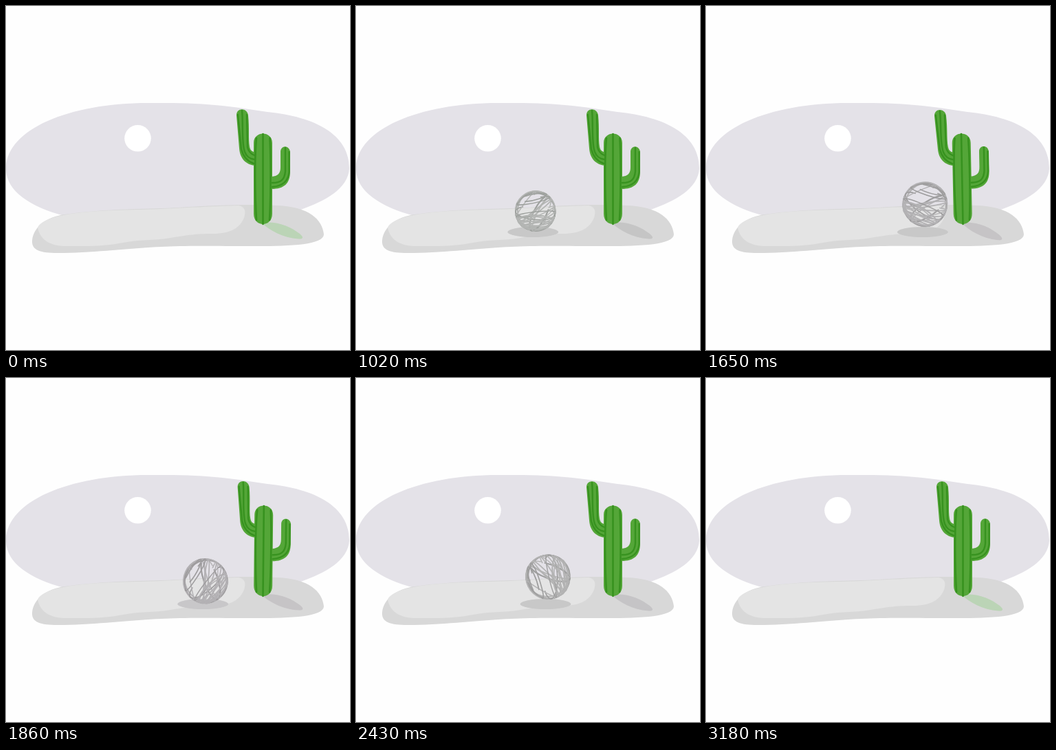
Animation, 500 px wide and 500 px high, one loop 4140 ms. Source, as an HTML page with a canvas:

```html
<!DOCTYPE html>
<html lang="en">
<head>
<meta charset="utf-8">
<title>Tumbleweed</title>
<style>
html, body { margin: 0; width: 100%; height: 100%; overflow: hidden; background: #fefefe; }
canvas { display: block; width: 500px; height: 500px; }
</style>
</head>
<body>
<canvas id="stage" width="500" height="500"></canvas>
<script>
const ctx = document.getElementById('stage').getContext('2d');
const LOOP = 4140, START = 60, END = 3180;

// Keyframes as [ms, value]
const travel = [[60, 62], [600, 133], [1020, 257], [1380, 326], [1650, 315], [2200, 250], [2700, 333], [3180, 442]];
const lift = [[60, 0], [330, 9], [600, 0], [830, 14], [1020, 3.5], [1080, 0], [1400, 18], [1650, 13.5],
  [2130, 0], [2200, 0], [2470, 13], [2700, 7.5], [2820, 0], [3000, 8], [3180, 0]];
const spin = [[60, -120], [600, 10], [1020, 150], [1380, 235], [1650, 180], [2200, 15], [2700, 145], [3180, 340]];
const radius = [[60, 29.5], [1020, 29.5], [1400, 32.5], [3180, 32.5]];
const sway = [[1330, 0], [1480, 2.8], [1650, -1.1], [1800, 0.7], [2000, 0]];
const tint = [[60, 1], [600, 0.6], [1020, 0], [2700, 0.05], [3180, 1]];
const alpha = [[60, 0], [300, 1], [2850, 1], [3180, 0]];

// Cubic interpolation that comes to rest at turning points
function at(keys, t) {
  const n = keys.length - 1;
  if (t <= keys[0][0]) return keys[0][1];
  if (t >= keys[n][0]) return keys[n][1];
  const i = keys.findIndex(k => k[0] > t) - 1;
  const rate = j => (keys[j + 1][1] - keys[j][1]) / (keys[j + 1][0] - keys[j][0]);
  const slope = j => {
    if (j === 0) return rate(0);
    if (j === n) return rate(n - 1);
    if (rate(j - 1) * rate(j) <= 0) return 0;
    return (keys[j + 1][1] - keys[j - 1][1]) / (keys[j + 1][0] - keys[j - 1][0]);
  };
  const span = keys[i + 1][0] - keys[i][0], u = (t - keys[i][0]) / span, v = 1 - u;
  return keys[i][1] * (1 + 2 * u) * v * v + slope(i) * span * u * v * v
    + keys[i + 1][1] * u * u * (3 - 2 * u) - slope(i + 1) * span * u * u * v;
}

const mix = (a, b, k) => `rgb(${a.map((c, i) => Math.round(c + (b[i] - c) * k))})`;

function fill(path, color) {
  ctx.fillStyle = color;
  ctx.fill(path);
}

function ellipse(x, y, rx, ry) {
  const p = new Path2D();
  p.ellipse(x, y, rx, ry, 0, 0, 7);
  return p;
}

const sky = new Path2D('M0 238C-2 180 92 139 215 141C290 140 330 146 380 154C450 161 499 187 499 236C497 266 465 283 426 297L300 320H100L85 305C35 292 1 269 0 238Z');
const dune = new Path2D('M38 341C40 321 58 307 85 303C145 294 215 295 250 293C310 289 360 288 395 290C440 292 460 310 462 332C461 347 415 349 365 349C300 349 260 348 225 350C165 353 125 359 75 359C50 359 37 355 38 341Z');
const light = new Path2D('M46 322C52 310 75 305 95 302C145 295 190 297 225 295C265 293 300 291 338 290C349 292 349 301 345 310C338 325 322 331 300 331C275 331 265 333 245 336C222 341 195 339 170 344C140 350 110 349 85 349C60 348 49 337 46 322Z');
const shade = new Path2D('M371 315C395 312 414 321 427 331C434 337 431 339 425 338.5C402 337 383 326 371 315Z');
const cactus = new Path2D('M335 159C335 147 351 148 352 159C354 178 352 193 354 204C355 211 359 212 364 213L363 232C348 231 340 221 339 207Z'
  + 'M399 212C399 202 412 202 413 212V241C413 258 404 266 386 266V248C396 247 399 243 399 234Z'
  + 'M360 199C360 181 387 181 387 199L387 302C387 322 360 322 360 302Z');
const ribs = new Path2D('M343 152C345 172 342 198 347 212C350 220 355 222 361 223M337 158L342 208Q346 224 360 229M350 158L351 205Q353 214 361 217'
  + 'M406 206V240C405 253 399 257 387 257M411.5 212V241Q410 261 387 263');
const bodyRibs = new Path2D('M364 192C361 220 362 280 364 311M373.5 186V317M383.5 192C385 220 385 280 383 311');

// Strands are tilted slices of a unit sphere
let seed = 11;
const rand = () => (seed = seed * 16807 % 2147483647) / 2147483647;
const strands = Array.from({ length: 25 }, (_, i) => {
  const rim = i < 5;
  const off = rim ? (rand() - 0.5) * 0.1 : (rand() - 0.5) * 1.4;
  const rx = Math.sqrt(1 - off * off) * 0.98;
  return { off, rx, ry: rim ? 0.88 + rand() * 0.1 : rx * (0.06 + rand() * 0.3),
    tilt: (rand() - 0.5) * (rim ? 6 : 1.2), from: rand() * 6, arc: rim ? 6.3 : 3 + rand() * 2,
    width: 1.1 + rand() * 1.1, dark: rand() < 0.3 };
});

function drawBall(x, y, r, angle, green) {
  ctx.save();
  ctx.translate(x, y);
  ctx.rotate(angle * Math.PI / 180);
  for (const s of strands) {
    ctx.save();
    ctx.rotate(s.tilt);
    ctx.beginPath();
    ctx.ellipse(0, s.off * r, s.rx * r, s.ry * r, 0, s.from, s.from + s.arc);
    ctx.lineWidth = s.width;
    ctx.strokeStyle = s.dark ? mix([158, 161, 158], [160, 204, 156], green) : mix([179, 181, 179], [176, 214, 172], green);
    ctx.stroke();
    ctx.restore();
  }
  ctx.restore();
}

function pivot(degrees, draw) {
  ctx.save();
  ctx.translate(373, 317);
  ctx.rotate(degrees * Math.PI / 180);
  ctx.translate(-373, -317);
  draw();
  ctx.restore();
}

function drawCactus() {
  fill(cactus, '#54a638');
  ctx.strokeStyle = '#37921f';
  ctx.lineCap = 'round';
  ctx.lineWidth = 2.4;
  ctx.stroke(ribs);
  ctx.lineWidth = 2.6;
  ctx.stroke(bodyRibs);
}

function draw(t) {
  const green = at(tint, t), lean = at(sway, t), x = at(travel, t);
  const seen = t > START && t < END ? Math.max(0, Math.min(1, at(alpha, t))) : 0;
  ctx.globalAlpha = 1;
  fill(ellipse(250, 250, 400, 400), '#fefefe');
  fill(sky, '#e4e2e8');
  fill(ellipse(191.5, 192.3, 19.3, 19.3), '#fff');
  fill(dune, '#d8d8d8');
  fill(light, '#e4e4e4');
  pivot(-1.8 * lean, () => fill(shade, mix([197, 197, 197], [187, 212, 182], green)));
  ctx.globalAlpha = seen;
  fill(ellipse(x, 328.5, 37, 7.5), mix([200, 200, 200], [195, 209, 192], green));
  ctx.globalAlpha = 1;
  pivot(lean, drawCactus);
  ctx.globalAlpha = seen;
  drawBall(x + 3.5, 301.5 - at(lift, t), at(radius, t), at(spin, t), Math.min(1, green * 1.6));
}

const began = performance.now();
function tick() {
  draw((performance.now() - began) % LOOP);
  requestAnimationFrame(tick);
}
tick();
</script>
</body>
</html>
```
